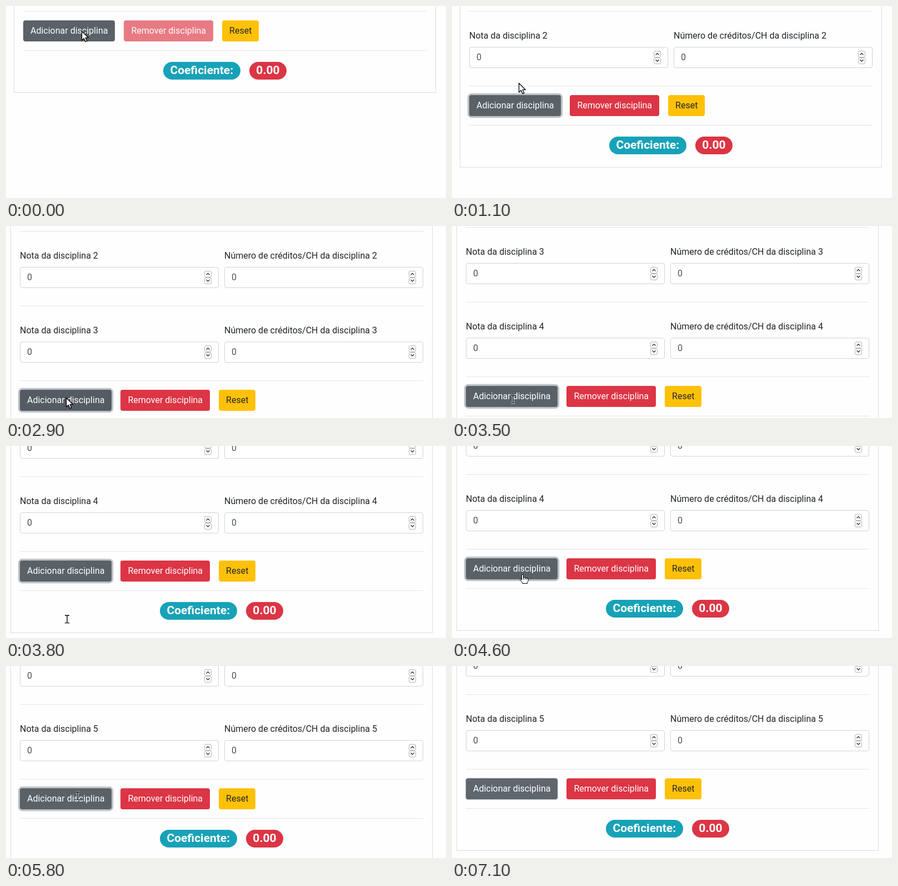
Recreate the animation shown at these times as an HTML page. Size 792 by 347 pixels, loop 7.2 s.

```html
<!DOCTYPE html>
<html lang="pt-BR">
<head>
<meta charset="utf-8">
<title>Coeficiente</title>
<style>
* { box-sizing: border-box; }
html, body { margin: 0; width: 100%; height: 100%; overflow: hidden; background: #fefefe; }
body { position: relative; font: 16px/24px Roboto, sans-serif; color: #212529; }
#card { position: absolute; top: 0; width: 760px; padding: 9px 16px 0; border: solid rgba(0,0,0,.125); border-width: 0 1px 1px; }
.line { border-bottom: 1px solid rgba(0,0,0,.1); }
.row { display: flex; gap: 10px; height: 135px; padding-top: 32px; }
.field { width: 358px; }
.input { position: relative; height: 38px; margin-top: 8px; padding: 6px 12px; border: 1px solid #ced4da; border-radius: 4px; background: #fff; color: #495057; }
.input svg { position: absolute; left: 330px; top: 5px; fill: #fff; stroke: #b4b4b4; }
.input .chevron { fill: none; stroke: #333; stroke-width: 1.3; }
.buttons { display: flex; gap: 16px; height: 71px; padding-top: 16px; }
.button { height: 38px; padding: 7px 13px; border-radius: 4px; color: #fff; white-space: nowrap; }
#remove { background: #dc3545; }
#reset { background: #ffc107; color: #212529; }
.badges { display: flex; justify-content: center; align-items: flex-start; gap: 16px; height: 75px; padding-top: 20px; }
.badge { padding: 5.25px 12.6px; border-radius: 16px; background: #17a2b8; color: #fff; font: bold 21px/21px Roboto, sans-serif; white-space: nowrap; }
.badge + .badge { background: #dc3545; }
#cursor { position: absolute; left: 0; top: 0; overflow: visible; fill: #fff; stroke: #000; stroke-linejoin: round; }
#ibeam { fill: none; }
</style>
</head>
<body>
<div id="card">
  <div class="line"></div>
  <div id="rows"></div>
  <div class="buttons line">
    <div class="button" id="add">Adicionar disciplina</div>
    <div class="button" id="remove">Remover disciplina</div>
    <div class="button" id="reset">Reset</div>
  </div>
  <div class="badges"><div class="badge">Coeficiente:</div><div class="badge">0.00</div></div>
</div>
<svg id="cursor" width="1" height="1">
  <path id="arrow" d="M.5 .5V17L4.3 13.4 7 19.6 9.8 18.4 7.1 12.3H12.2Z" stroke-width="1.3"/>
  <path id="hand" d="M-1.5 10V1.8a1.5 1.5 0 0 1 3 0V6q2-1 3 .5 2-.8 3 .5 2.7-.5 2.7 1.5V12L8.5 14.5V16.5H0V15L-4.2 10.5q-.6-2.2 1-2ZM1.5 6v3.500M4.500 6.500v3M7.500 7v2.500"/>
  <g id="ibeam">
    <path d="M-2-4Q1.500-4 2-3 2.500-4 6-4M2-3V9M-2 10Q1.500 10 2 9 2.500 10 6 10" stroke="#fff" stroke-width="3"/>
    <path d="M-2-4Q1.500-4 2-3 2.500-4 6-4M2-3V9M-2 10Q1.500 10 2 9 2.500 10 6 10" stroke-width="1.4"/>
  </g>
</svg>
<script>
const LOOP = 7200, STEP = 100;
const $ = id => document.getElementById(id);

const field = label => `<div class="field">${label}<div class="input">0
  <svg width="16" height="28"><rect x="1.500" y="1.500" width="12" height="11" rx="2.500"/><rect x="1.500" y="13.500" width="12" height="11" rx="2.500"/>
  <path class="chevron" d="M4.500 8.500l3-3 3 3M4.500 17l3 3 3-3"/></svg></div></div>`;
$('rows').innerHTML = [2, 3, 4, 5].map(n => `<div class="row line">
  ${field(`Nota da disciplina ${n}`)}${field(`Número de créditos/CH da disciplina ${n}`)}</div>`).join('');
const rows = [...$('rows').children];

// Mouse-down and release times; every release adds a row.
const clicks = [[500, 700], [1500, 1700], [2800, 3100], [4800, 5000]];
const path = [[0, 136, 45], [900, 136, 45], [1000, 131, 92], [1100, 120, 139], [1300, 112, 176],
  [1700, 112, 176], [2200, 131, 291], [2500, 108, 310], [4200, 108, 310],
  [4600, 127, 232], [6300, 127, 232], [6700, 42, -25]];
const shapes = [[0, 'arrow'], [700, 'ibeam'], [1000, 'arrow'], [1200, 'hand'], [1500, 'arrow'],
  [1700, 'ibeam'], [2200, 'arrow'], [2400, 'hand'], [2800, 'arrow'], [3100, 'ibeam'],
  [4000, 'arrow'], [4500, 'hand'], [4800, 'arrow'], [5000, 'ibeam'], [6000, 'hand'], [6400, 'arrow']];
const scroll = [[3200, 0], [3300, 5], [3400, 70], [3500, 142], [3600, 190], [3700, 215], [3800, 224],
  [3900, 224], [4000, 228], [5400, 228], [5500, 233], [5600, 273], [5700, 318], [5800, 345],
  [5900, 358], [6000, 363]];

const clamp = v => Math.min(1, Math.max(0, v));

function sample(keys, t, column = 1) {
  const i = keys.findIndex(k => k[0] > t);
  if (i < 0) return keys.at(-1)[column];
  if (i === 0) return keys[0][column];
  const a = keys[i - 1], b = keys[i];
  return a[column] + (b[column] - a[column]) * (t - a[0]) / (b[0] - a[0]);
}

function render(t) {
  const count = clicks.filter(c => t >= c[1]).length;
  rows.forEach((row, i) => row.style.display = i < count ? 'flex' : 'none');
  $('card').style.left = (count > 1 ? 8 : 14) + 'px';
  $('card').style.top = -Math.round(sample(scroll, t)) + 'px';
  $('remove').style.opacity = count ? 1 : .65;

  const pressed = clicks.some(c => t >= c[0] && t < c[1]);
  const blurred = t >= 7100;
  const focus = blurred ? .45 : clamp((t - 440) / 150);
  $('add').style.background = blurred ? '#5f666d' : pressed ? '#545b62' : '#5a6268';
  $('add').style.boxShadow = `0 0 0 ${3.2 * focus}px rgba(130,138,145,${.5 * focus})`;

  const shape = shapes.findLast(s => s[0] <= t)[1];
  for (const id of ['arrow', 'hand', 'ibeam']) $(id).style.display = id === shape ? '' : 'none';
  $('cursor').style.transform = `translate(${Math.round(sample(path, t))}px, ${Math.round(sample(path, t, 2))}px)`;
}

const start = performance.now();
function tick() {
  const t = (performance.now() - start) % LOOP;
  render(Math.floor(t / STEP) * STEP);
  requestAnimationFrame(tick);
}
tick();
</script>
</body>
</html>
```
